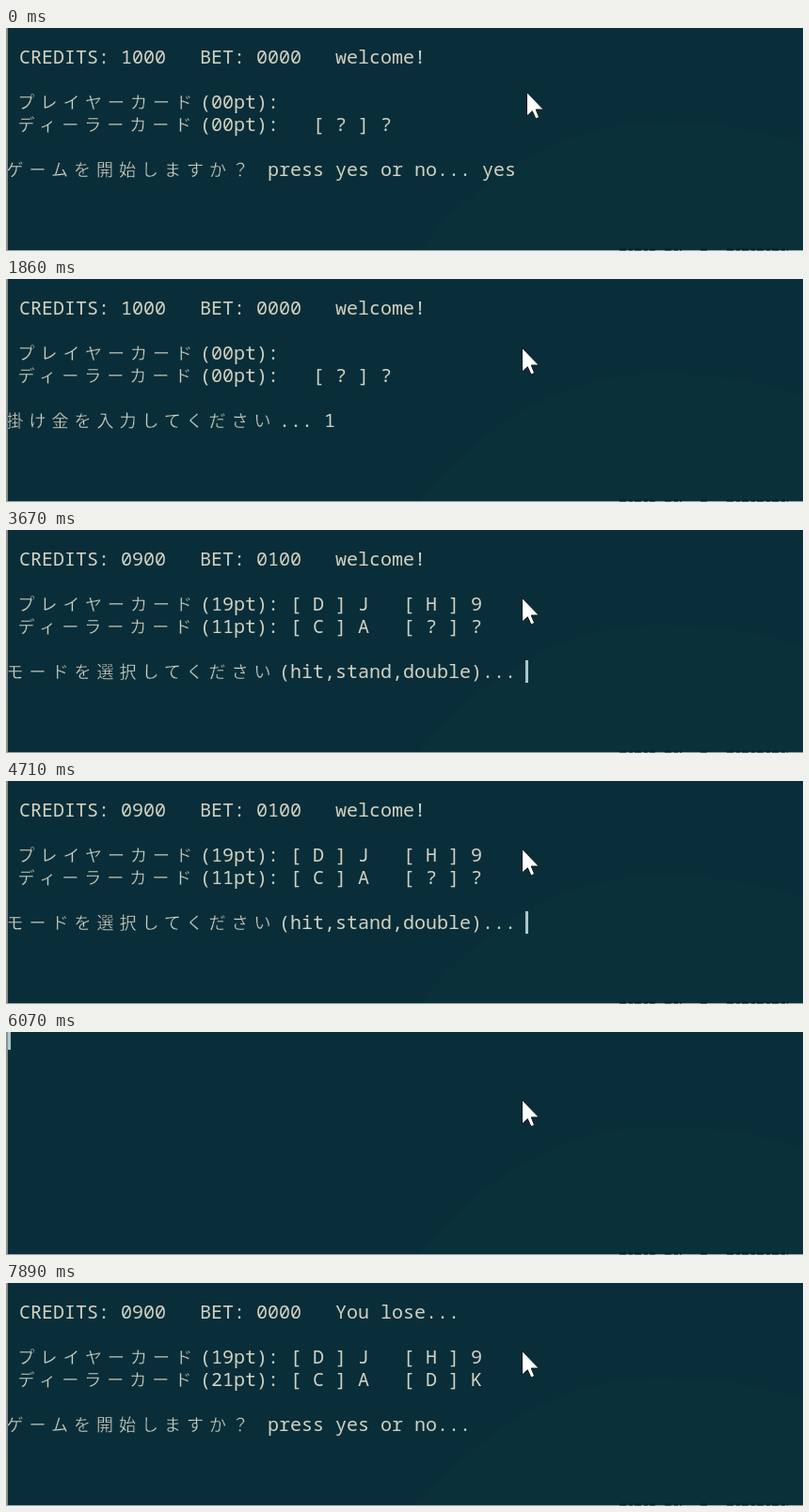
Animation of 847 by 238 pixels, one loop 8 s. Source, as an HTML page:

```html
<!DOCTYPE html>
<html lang="ja">
<head>
<meta charset="utf-8">
<title>Card game terminal</title>
<style>
html, body { margin: 0; width: 100%; height: 100%; overflow: hidden; background: #092e39; }
svg { display: block; }
text { white-space: pre; fill: #d3d1c1; font-kerning: none; font-variant-ligatures: none; }
.latin { font: 500 20px "Noto Sans Mono", "DejaVu Sans Mono", monospace; }
.kana { font: 300 18px "Noto Sans CJK JP", "Noto Sans CJK", sans-serif; letter-spacing: 6px; stroke: #092e39; stroke-width: .3px; }
</style>
</head>
<body>
<svg width="847" height="238" viewBox="0 0 847 238">
  <rect width="847" height="238" fill="#092e39"/>
  <path d="M438 238C490 176 570 101 700 101Q780 101 847 125V238Z" fill="#0a303a"/>
  <rect width="2" height="238" fill="#8c9091"/>
  <rect y="237" width="847" height="1" fill="#98a5a8"/>
  <path d="M652 236.5H690M700 236.5H718M738 236.5H747M766 236.5H831" stroke="#06202a" stroke-width="2" stroke-dasharray="7 3 4 2"/>
  <g id="lines"></g>
  <rect id="caret" fill="#a9c9cf"/>
  <path id="mouse" d="M.5 .5V26L6.3 20.7L10 29L13.6 27.3L10.2 19H18.3Z" fill="#fff" stroke="#10181b" stroke-width="1" stroke-linejoin="round"/>
</svg>
<script>
const LOOP = 8000, CELL = 12, LEFT = 2, ROW = 24;
const $ = id => document.getElementById(id);

const START = 'ゲームを開始しますか？ press yes or no... ';
const BET = '掛け金を入力してください... ';
const MODE = 'モードを選択してください(hit,stand,double)... ';

const status = (credits, bet, note) => ` CREDITS: ${credits}   BET: ${bet}   ${note}`;
const player = (points, cards) => ` プレイヤーカード(${points}pt): ${cards}`;
const dealer = (points, cards) => ` ディーラーカード(${points}pt): ${cards}`;
const board = (top, mine, theirs) => ['', top, '', mine, theirs, ''];

const intro = board(status('1000', '0000', 'welcome!'), player('00', ''), dealer('00', '  [ ? ] ?'));
const dealt = board(status('0900', '0100', 'welcome!'), player('19', '[ D ] J   [ H ] 9'), dealer('11', '[ C ] A   [ ? ] ?'));
const lost = board(status('0900', '0000', 'You lose...'), player('19', '[ D ] J   [ H ] 9'), dealer('21', '[ C ] A   [ D ] K'));

// caret: [x, y, width, height]
const at = (x, w = 3) => [x, 139, w, ROW];
const nextRow = [2, 163, 3, ROW];
const off = null;

// Each step changes only the listed properties
const steps = [
  [0, { screen: intro, input: START + 'yes', caret: off, mouse: [553, 68] }],
  [80, { caret: nextRow }],
  [140, { input: BET, caret: at(336) }],
  [670, { caret: off }],
  [940, { mouse: [548, 73] }],
  [1190, { caret: at(336) }],
  [1340, { input: BET + '1', caret: at(350) }],
  [1860, { caret: off }],
  [2080, { input: BET + '10', caret: at(362) }],
  [2260, { input: BET + '100', caret: at(374) }],
  [2540, { caret: nextRow }],
  [2600, { screen: dealt, input: MODE, caret: at(552) }],
  [3120, { caret: off }],
  [3520, { mouse: [548, 72] }],
  [3670, { caret: at(552) }],
  [4220, { caret: off }],
  [4710, { caret: at(552) }],
  [5020, { input: MODE + 's', caret: at(566, 2) }],
  [5210, { input: MODE + 'sta', caret: at(590, 2) }],
  [5360, { input: MODE + 'stan', caret: at(602, 2) }],
  [5540, { input: MODE + 'stand', caret: at(614, 2) }],
  [6070, { screen: [], input: '', caret: [2, 0, 3, 19] }],
  [6160, { screen: lost, caret: off }],
  [6250, { input: START, caret: at(504) }],
  [6720, { caret: off }],
  [7090, { mouse: [548, 71] }],
  [7340, { caret: at(504) }],
  [7810, { mouse: [548, 72] }],
  [7890, { caret: off }]
];

// Split a line into narrow and wide runs on the character grid
function lineMarkup(line, row) {
  let col = 0, out = '';
  for (const run of line.match(/[ -~]+|[^ -~]+/g) || []) {
    const wide = run.charCodeAt(0) > 126;
    const x = LEFT + col * CELL - (wide ? 1.5 : 0);
    out += `<text class="${wide ? 'kana' : 'latin'}" x="${x}" y="${row * ROW + 14}">${run}</text>`;
    col += run.length * (wide ? 2 : 1);
  }
  return out;
}

let shown = '';
function render(t) {
  const state = {};
  for (const [time, change] of steps) if (time <= t) Object.assign(state, change);

  const markup = [...state.screen, state.input].map(lineMarkup).join('');
  if (markup !== shown) $('lines').innerHTML = shown = markup;

  const box = state.caret || [0, 0, 0, 0];
  ['x', 'y', 'width', 'height'].forEach((name, i) => $('caret').setAttribute(name, box[i]));
  $('mouse').setAttribute('transform', `translate(${state.mouse})`);
}

let begin;
function tick(now) {
  begin ??= now;
  render((now - begin) % LOOP);
  requestAnimationFrame(tick);
}
render(0);
requestAnimationFrame(tick);
</script>
</body>
</html>
```
